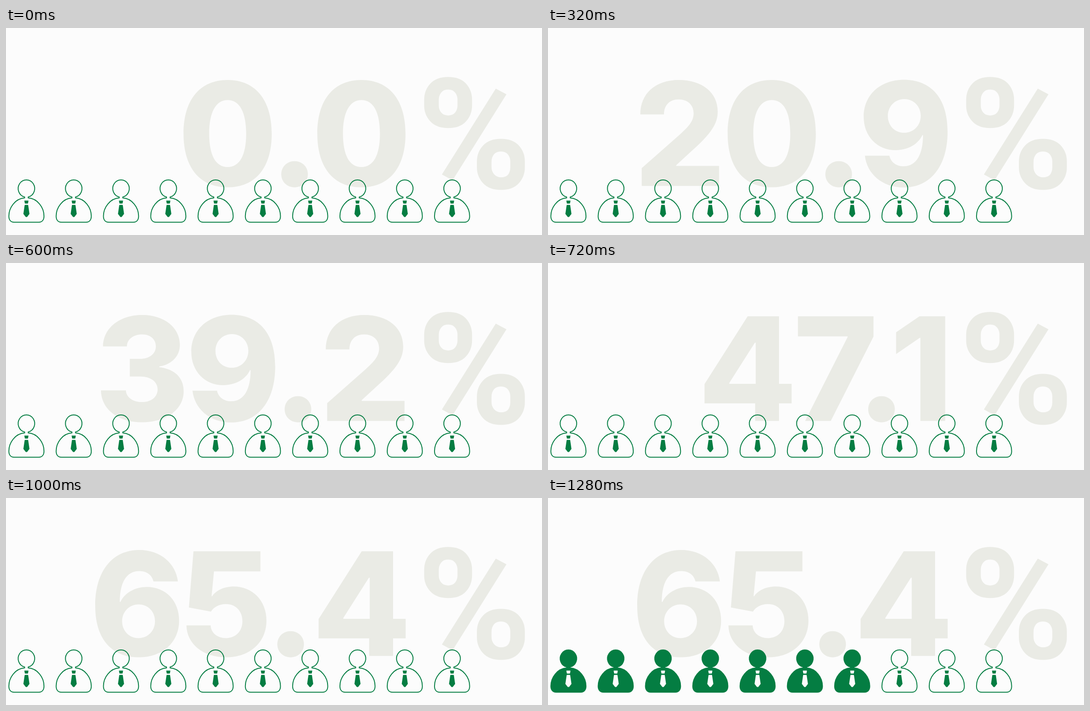
An HTML page with a canvas for the animation above (2960 ms loop, 1202 by 466 pixels).

```html
<!DOCTYPE html>
<html lang="en">
<head>
<meta charset="utf-8">
<title>Percentage counter</title>
<style>
  html, body { margin: 0; width: 100%; height: 100%; overflow: hidden; background: #fcfcfc; }
  canvas { display: block; }
</style>
</head>
<body>
<canvas id="stage" width="1202" height="466"></canvas>
<script>
const ctx = document.getElementById('stage').getContext('2d');
const PAPER = '#fcfcfc', GREY = '#eaebe5', GREEN = '#047d42';
const DIGITS = '800 323.5px Inter, sans-serif', PERCENT = '700 348px Roboto, sans-serif';
const LOOP = 2960, STEP = 40, COUNT_END = 1000, FADE = 280;
const TARGET = 65.4, PEOPLE = 10, FILLED = 7, FIRST_X = 45.8, PITCH = 106.06;

const person = new Path2D(`M-4 380.4 A18.5 19.4 0 1 1 4 380.4 V382.6
  C25 384 39.4 404 39.4 423.5 C39.4 432 35 437.2 27.5 437.2 H-27.5
  C-35 437.2 -39.4 432 -39.4 423.5 C-39.4 404 -25 384 -4 382.6 Z`);
const tie = new Path2D(`M-3.8 389.2 H3.8 L2.8 394.4 H-2.8 Z
  M-3.2 399 H3.2 L6 418.3 L1 424.8 H-1 L-6 418.3 Z`);

ctx.lineJoin = 'round';
const width = text => ctx.measureText(text).width;

// Pen position after the last glyph when the ink of `text` ends at x.
function penEnd(text, x) {
  const box = ctx.measureText(text);
  return x + box.width - box.actualBoundingBoxRight;
}

ctx.font = PERCENT;
const percentEnd = penEnd('%', 1166.3);

// One digit plus the point advances 300px.
ctx.font = DIGITS;
const tracking = (300 - width('0.0') + width('0')) / 2 + 'px';
ctx.letterSpacing = tracking;
const digitsEnd = penEnd('0', 897.5);

function drawText(text, font, spacing, end, baseline) {
  ctx.font = font;
  ctx.letterSpacing = spacing;
  ctx.fillText(text, end - width(text), baseline);
}

function drawTie(color) {
  ctx.fillStyle = ctx.strokeStyle = color;
  ctx.lineWidth = 1.6;
  ctx.fill(tie);
  ctx.stroke(tie);
}

function drawPerson(x, fill) {
  ctx.save();
  ctx.translate(x, 0);
  ctx.globalAlpha = fill;
  ctx.fillStyle = GREEN;
  ctx.fill(person);
  ctx.globalAlpha = 1;
  ctx.strokeStyle = GREEN;
  ctx.lineWidth = 2;
  ctx.stroke(person);
  drawTie(GREEN);
  ctx.globalAlpha = fill;
  drawTie(PAPER);
  ctx.restore();
}

function draw(time) {
  const t = Math.floor((time % LOOP) / STEP) * STEP;
  const value = TARGET * Math.min(t / COUNT_END, 1);
  const progress = Math.min(Math.max((t - COUNT_END) / FADE, 0), 1);
  const fill = (1 - Math.cos(Math.PI * progress)) / 2;

  ctx.fillStyle = PAPER;
  ctx.fillRect(0, 0, 1202, 466);
  ctx.fillStyle = GREY;
  drawText(value.toFixed(1), DIGITS, tracking, digitsEnd, 355.4);
  drawText('%', PERCENT, '0px', percentEnd, 361.2);
  for (let i = 0; i < PEOPLE; i++) drawPerson(FIRST_X + PITCH * i, i < FILLED ? fill : 0);
}

const start = performance.now();
(function frame() {
  draw(performance.now() - start);
  requestAnimationFrame(frame);
})();
</script>
</body>
</html>
```
